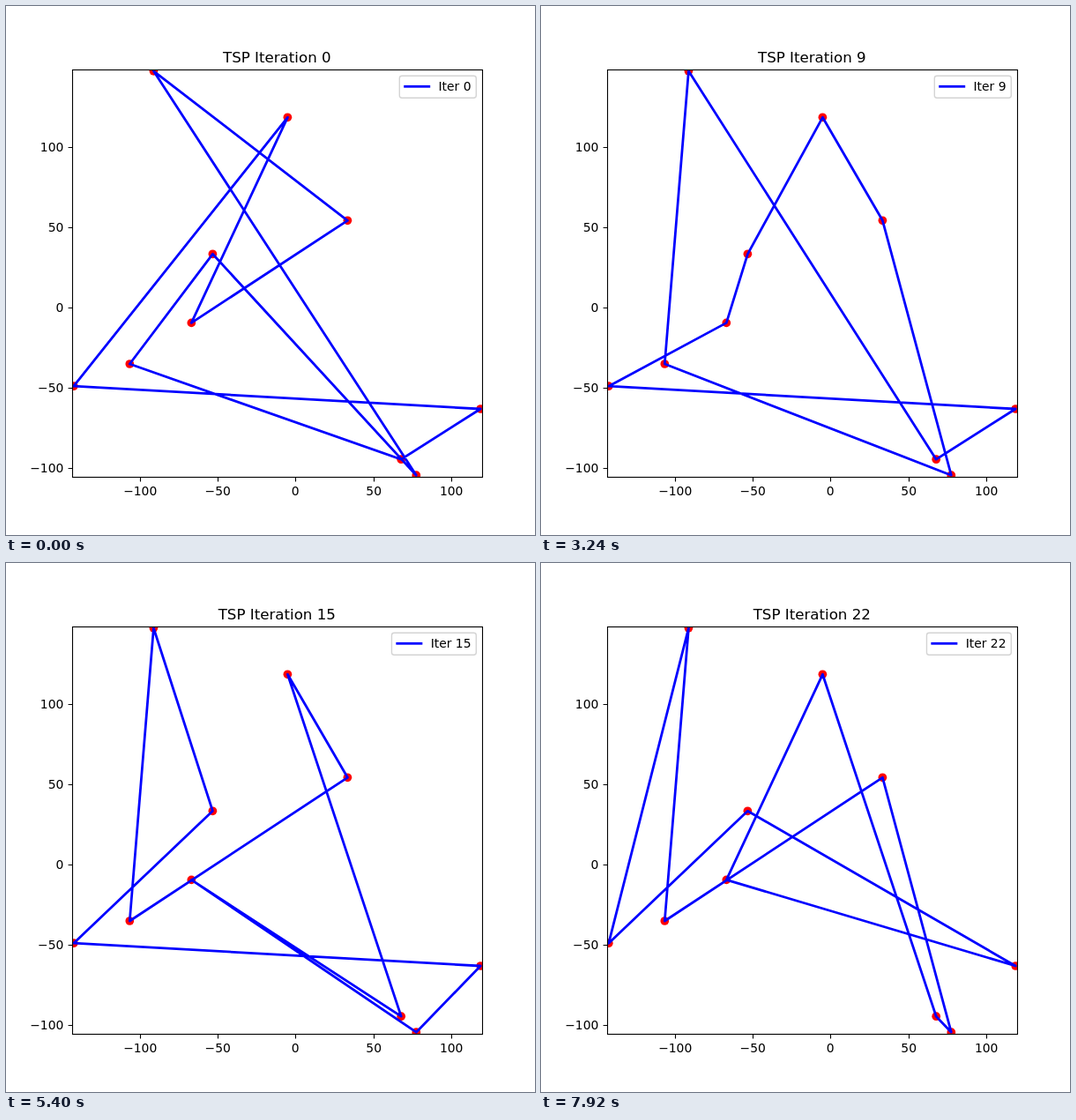
Write an HTML page that moves like this. It is 600x600 px and loops after 8000 ms.

```html
<!DOCTYPE html>
<html lang="en">
<head>
<meta charset="utf-8">
<title>TSP Iteration</title>
<style>
  html, body { margin: 0; width: 100%; height: 100%; overflow: hidden; background: #fff; }
  svg { display: block; width: 600px; height: 600px; }
  text { font: 13.89px "DejaVu Sans", sans-serif; fill: #000; }
  .mid { text-anchor: middle; }
  .end { text-anchor: end; }
  #title { font-size: 16.67px; }
  .axis { fill: none; stroke: #000; stroke-width: 1.11; }
  .route { fill: none; stroke: #00f; stroke-width: 2.78; stroke-linejoin: round; }
  #cities { fill: #f00; }
</style>
</head>
<body>
<svg viewBox="0 0 600 600">
  <clipPath id="plot"><rect x="75" y="72" width="465" height="462"/></clipPath>
  <g clip-path="url(#plot)">
    <g id="cities"></g>
    <polygon id="tour" class="route"/>
  </g>
  <g id="ticks"></g>
  <rect class="axis" x="75.5" y="72.5" width="465" height="462"/>
  <text id="title" class="mid" x="307.3" y="64"></text>
  <g id="key">
    <rect id="box" x="446.3" y="79.3" height="25" rx="2.8" fill="#fff" stroke="#d4d4d4" stroke-width="1.39"/>
    <path id="sample" class="route" stroke-linecap="square" d="M452.6 91.3h27.2"/>
    <text id="label" class="end" x="527.5" y="96"></text>
  </g>
</svg>
<script>
const STEP = 360, LOOP = 8000, DIGIT = 8.84;
const cities = {
  A: [167.4, 73.8], B: [319.4, 126.3], C: [387.4, 243.3], D: [234.4, 281.3],
  E: [210.3, 359.4], F: [140.3, 406], G: [76.8, 431.2], H: [538.2, 457],
  I: [448.2, 514.2], J: [465.3, 532.2]
};

// Each iteration swaps two cities of the tour; a blank one keeps it.
const swaps = "HJ JD AG DI AC AE IJ DF AD DE DF IF HC BG JG AB JE BJ - DG - AJ".split(" ");
const tours = ["ACEBGHIFDJ"];
for (const pair of swaps) {
  const [a, b] = pair;
  tours.push([...tours.at(-1)].map(c => c === a && b ? b : c === b ? a : c).join(""));
}

const $ = id => document.getElementById(id);
function add(parent, name, attrs, text = "") {
  const el = document.createElementNS("http://www.w3.org/2000/svg", name);
  for (const key in attrs) el.setAttribute(key, attrs[key]);
  el.textContent = text;
  parent.append(el);
}

for (const [cx, cy] of Object.values(cities)) add($("cities"), "circle", { cx, cy, r: 4.85 });

for (let v = -100; v <= 100; v += 50) {
  const name = String(v).replace("-", "\u2212");
  const x = Math.floor(328.9 + v * 1.767) + 0.5;
  const y = Math.floor(342.3 - v * 1.822) + 0.5;
  add($("ticks"), "path", { class: "axis", d: `M${x} 534.5v4.9M75.5 ${y}h-4.9` });
  add($("ticks"), "text", { class: "mid", x: x - 0.3, y: 555 }, name);
  add($("ticks"), "text", { class: "end", x: 65.3, y: y + 4.8 }, name);
}

let shown = -1;
function draw() {
  const n = Math.floor(performance.now() % LOOP / STEP);
  if (n !== shown) {
    shown = n;
    const shift = n > 9 ? DIGIT : 0;
    $("tour").setAttribute("points", [...tours[n]].map(c => cities[c]).join(" "));
    $("title").textContent = "TSP Iteration " + n;
    $("label").textContent = "Iter " + n;
    $("box").setAttribute("x", 446.3 - shift);
    $("box").setAttribute("width", 87 + shift);
    $("sample").setAttribute("transform", `translate(${-shift} 0)`);
  }
  requestAnimationFrame(draw);
}
draw();
</script>
</body>
</html>
```
